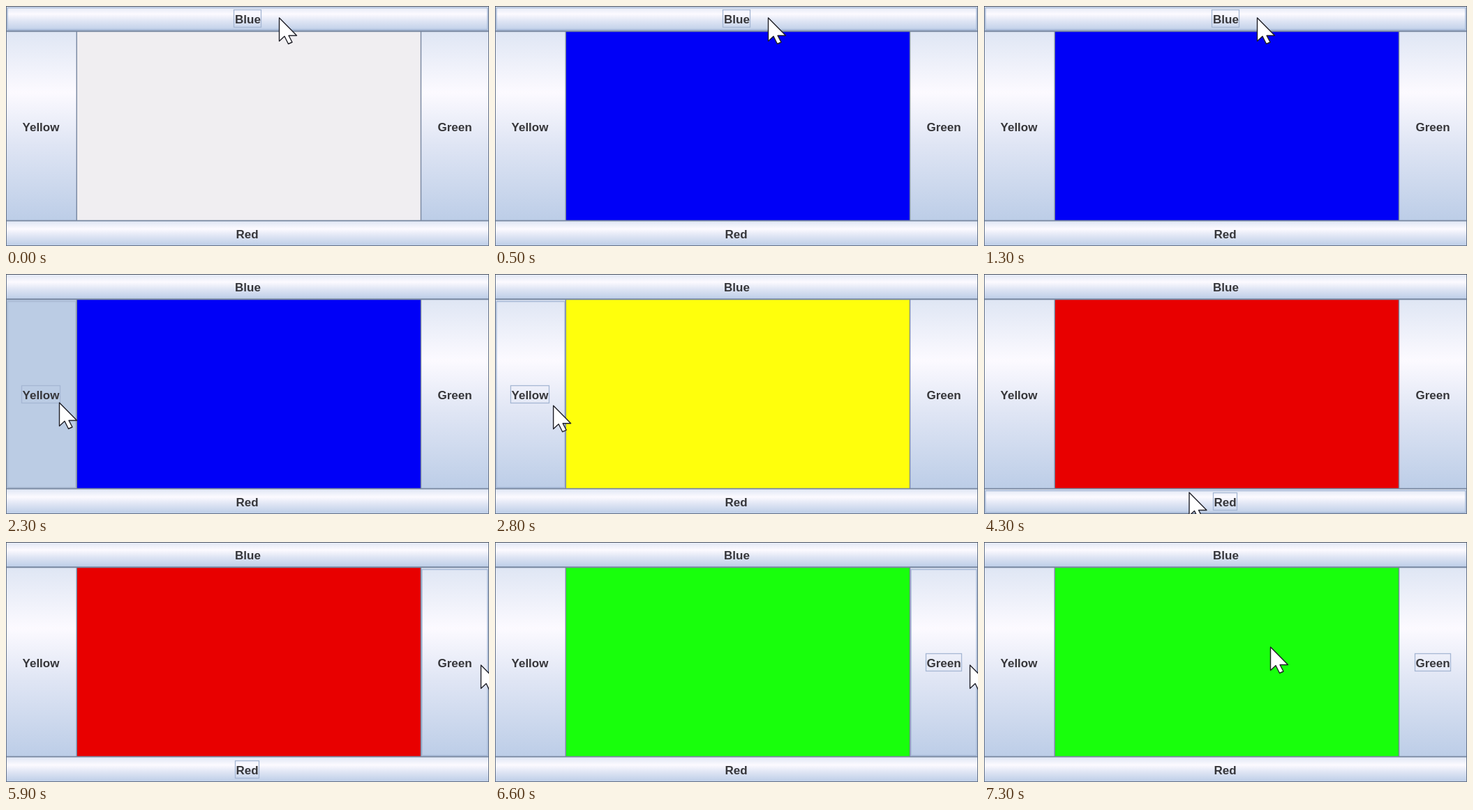
An HTML page with a canvas for the animation above (7800 ms loop, 692 by 345 pixels).

```html
<!DOCTYPE html>
<html lang="en">
<head>
<meta charset="utf-8">
<title>Border layout colour buttons</title>
<style>
  html, body { margin: 0; width: 100%; height: 100%; overflow: hidden; }
  canvas { display: block; }
</style>
</head>
<body>
<canvas id="stage" width="692" height="345"></canvas>
<script>
const ctx = document.getElementById('stage').getContext('2d');
const LOOP = 7800, STEP = 100;

const buttons = {
  Blue:   { x: 0,   y: 0,   w: 692, h: 36,  tx: 346.5, base: 25,  fill: '#0000f7' },
  Yellow: { x: 0,   y: 37,  w: 102, h: 272, tx: 50,    base: 180, fill: '#ffff0c' },
  Green:  { x: 594, y: 37,  w: 98,  h: 272, tx: 643,   base: 180, fill: '#18ff0c' },
  Red:    { x: 0,   y: 309, w: 692, h: 36,  tx: 345.5, base: 334, fill: '#e80000' }
};

const clicks = [
  { name: 'Blue',   down: 100,  up: 300 },
  { name: 'Yellow', down: 2100, up: 2400 },
  { name: 'Red',    down: 4100, up: 4300 },
  { name: 'Green',  down: 6200, up: 6400 }
];

// Pointer stops: time, x, y
const path = [
  [0, 391, 17], [1400, 391, 17], [1900, 76, 185], [2700, 76, 185],
  [3600, 284, 310], [3800, 293.5, 314], [5100, 293.5, 314],
  [5600, 668, 184], [5700, 668, 184], [5900, 680, 177],
  [6800, 680, 177], [7300, 410, 151], [LOOP, 410, 151]
];

function pointerAt(t) {
  const i = path.findIndex(p => p[0] > t);
  const [t0, x0, y0] = path[i - 1], [t1, x1, y1] = path[i];
  const k = (t - t0) / (t1 - t0), e = k * k * (3 - 2 * k);
  return { x: x0 + (x1 - x0) * e, y: y0 + (y1 - y0) * e };
}

function line(x0, y0, x1, y1, color, width) {
  ctx.strokeStyle = color;
  ctx.lineWidth = width;
  ctx.beginPath();
  ctx.moveTo(x0, y0);
  ctx.lineTo(x1, y1);
  ctx.stroke();
}

function box(x, y, w, h, color, width) {
  ctx.strokeStyle = color;
  ctx.lineWidth = width;
  ctx.strokeRect(x, y, w, h);
}

function drawButton(name, hover, pressed, focused) {
  const { x, y, w, h, tx, base } = buttons[name];
  const shade = ctx.createLinearGradient(0, y, 0, y + h);
  shade.addColorStop(0, '#dfe6f4');
  shade.addColorStop(0.32, '#fcfaff');
  shade.addColorStop(0.6, '#dfe5f4');
  shade.addColorStop(1, '#bccde7');
  ctx.fillStyle = pressed ? '#bbcce4' : shade;
  ctx.fillRect(x, y, w, h);
  if (hover) box(x + 2, y + 2.5, w - 4, h - 4.5, pressed ? '#a9b9d1' : '#a6b9d6', 1.5);
  ctx.fillStyle = '#36363a';
  ctx.fillText(name, tx, base);
  if (focused) {
    const tw = Math.round(ctx.measureText(name).width) + 2;
    box(Math.round(tx - tw / 2) - 0.5, base - 19.5, tw, 25, '#a5b7d3', 1.3);
  }
}

function drawBorders() {
  const edge = '#7887a0';
  line(0, 36.2, 692, 36.2, edge, 2);
  line(0, 308.7, 692, 308.7, edge, 1.8);
  line(101.3, 37, 101.3, 309, edge, 1.4);
  line(594.5, 37, 594.5, 309, edge, 1.4);
  box(0.5, 0.5, 691, 344, '#667389', 1);
  line(0, 0.5, 692, 0.5, '#4e5562', 1);
}

function drawPointer({ x, y }) {
  ctx.save();
  ctx.translate(x + 0.5, y);
  ctx.fillStyle = '#fff';
  ctx.strokeStyle = '#202028';
  ctx.lineWidth = 1.4;
  ctx.lineJoin = 'round';
  const arrow = new Path2D('M0 0V33.5L7.5 26.5L13 37.5L18.5 35L13.5 25.5H25Z');
  ctx.fill(arrow);
  ctx.stroke(arrow);
  ctx.restore();
}

function draw(t) {
  const pointer = pointerAt(t);
  const pressed = clicks.find(c => t >= c.down && t < c.up);
  const focus = clicks.filter(c => t >= c.down).pop() || clicks[0];
  const chosen = clicks.filter(c => t >= c.up).pop();

  ctx.font = 'bold 17px "Liberation Sans", Arial, sans-serif';
  ctx.textAlign = 'center';
  ctx.fillStyle = chosen ? buttons[chosen.name].fill : '#f0eef1';
  ctx.fillRect(0, 0, 692, 345);

  for (const [name, b] of Object.entries(buttons)) {
    const hover = pointer.x >= b.x && pointer.x < b.x + b.w &&
                  pointer.y >= b.y && pointer.y < b.y + b.h;
    drawButton(name, hover, pressed?.name === name, focus.name === name);
  }
  drawBorders();
  drawPointer(pointer);
}

const start = performance.now();
function tick() {
  const t = (performance.now() - start) % LOOP;
  draw(Math.floor(t / STEP) * STEP);
  requestAnimationFrame(tick);
}
tick();
</script>
</body>
</html>
```
